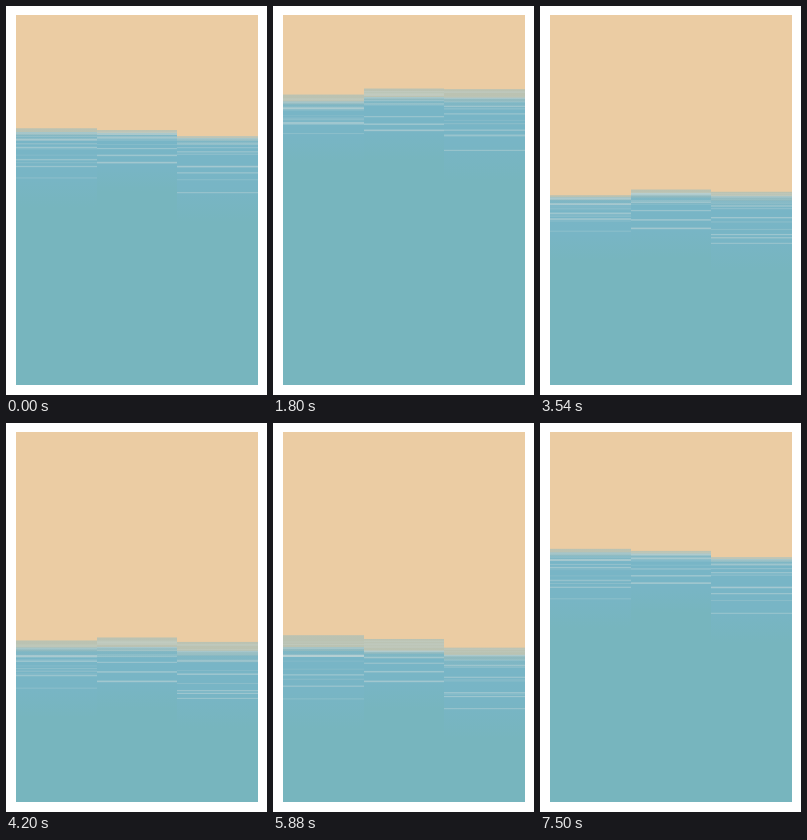
Write an HTML page with a canvas that moves like this. It is 261x389 px and loops after 7.56 s.

```html
<!DOCTYPE html>
<html lang="en">
<head>
<meta charset="utf-8">
<title>Tide</title>
<style>
html, body { margin: 0; width: 100%; height: 100%; overflow: hidden; background: #fff; }
canvas { display: block; }
</style>
</head>
<body>
<canvas id="stage" width="261" height="389"></canvas>
<script>
const ctx = document.getElementById('stage').getContext('2d');
const LOOP = 7560, STEP = 60, LOWEST_WATER = 1380;
const TOP = 9, BOTTOM = 379;
const SAND = '#ebcca3';

// surface: [mean, cos, sin, cos of double angle]
// lines: [mean, cos, sin, thickness, opacity], from the surface down
const columns = [
  {
    x: 10, w: 81, seed: 7,
    surface: [158.5, 74, 10, 5],
    lines: [
      [165, 77, 8, 2, 0.35],
      [172, 78, 8, 2, 0.5],
      [180, 71, 11, 1.5, 0.45],
      [194, 83, 0, 1.3, 0.4],
      [206, 84, 0, 1, 0.25]
    ]
  },
  {
    x: 91, w: 80, seed: 19,
    surface: [157, 77, 5, 5],
    lines: [
      [164.5, 80, 5, 1.5, 0.4],
      [171, 81, 7, 1.2, 0.4],
      [180, 77, 7, 1.2, 0.4],
      [188, 78, 8, 1.5, 0.45],
      [196, 80, 8, 1.6, 0.5]
    ]
  },
  {
    x: 171, w: 81, seed: 42,
    surface: [161.5, 80, 2, 5],
    lines: [
      [167, 82, 5, 1.5, 0.4],
      [176, 83, 5, 1.3, 0.4],
      [186, 86, 6, 1.3, 0.4],
      [202, 86, 7, 1.2, 0.45],
      [206.5, 84.5, 6, 1.2, 0.45],
      [219, 80, 0, 1.1, 0.4]
    ]
  }
];

function random(seed) {
  return () => (seed = (seed * 16807) % 2147483647) / 2147483647;
}

// faint ripples, most of them close to the surface
for (const col of columns) {
  const rnd = random(col.seed * 9973);
  col.ripples = Array.from({ length: 9 }, () => ({
    depth: Math.pow(rnd(), 1.6) * 0.8,
    sway: (rnd() - 0.5) * 3,
    alpha: 0.12 + rnd() * 0.2
  }));
}

function height([mean, a, b, c], angle, twice) {
  return mean - a * Math.cos(angle) + b * Math.sin(angle) -
    (twice ? c * Math.cos(2 * angle) : 0);
}

function drawColumn(col, angle) {
  const { x, w } = col;
  const top = height(col.surface, angle, true);
  const ys = col.lines.map(line => Math.max(top + 2, height(line, angle)));
  const low = ys[ys.length - 1];

  const water = ctx.createLinearGradient(0, top, 0, low + 30);
  water.addColorStop(0, 'rgb(120,181,199)');
  water.addColorStop(0.6, 'rgb(120,181,197)');
  water.addColorStop(1, 'rgb(119,181,190)');
  ctx.fillStyle = water;
  const layers = [
    [top, 0.42],
    [ys[0], 0.65],
    [(ys[0] + ys[1]) / 2, 0.7],
    [ys[1] + 2, 1]
  ];
  for (const [y, alpha] of layers) {
    ctx.globalAlpha = alpha;
    ctx.fillRect(x, y, w, BOTTOM - y);
  }

  ctx.fillStyle = 'rgb(203,217,217)';
  for (const r of col.ripples) {
    const y = top + 1 + (low - top) * r.depth + r.sway * Math.sin(angle);
    ctx.globalAlpha = r.alpha;
    ctx.fillRect(x, Math.max(top, y), w, 1);
  }
  col.lines.forEach(([, , , thick, alpha], i) => {
    ctx.globalAlpha = alpha;
    ctx.fillRect(x, ys[i], w, thick);
  });
  ctx.globalAlpha = 1;
}

function draw(t) {
  const angle = 2 * Math.PI * (t - LOWEST_WATER) / LOOP;
  ctx.fillStyle = '#fff';
  ctx.fillRect(0, 0, 261, 389);
  ctx.fillStyle = SAND;
  ctx.fillRect(10, TOP, 242, BOTTOM - TOP);
  for (const col of columns) drawColumn(col, angle);
}

const start = performance.now();
function tick() {
  const t = (performance.now() - start) % LOOP;
  draw(Math.floor(t / STEP) * STEP);
  requestAnimationFrame(tick);
}
tick();
</script>
</body>
</html>
```
